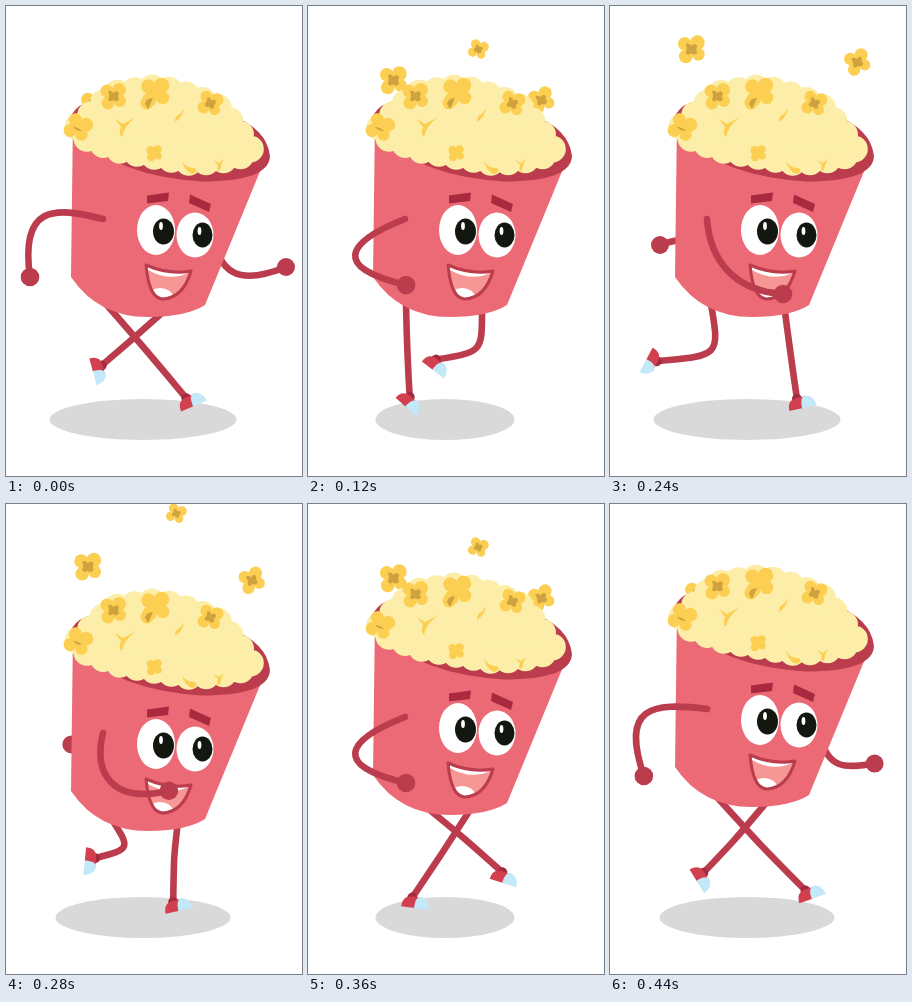
These frames come from a looping animation (296x470 px, 480 ms). An HTML page:

```html
<!DOCTYPE html>
<html lang="en">
<head>
<meta charset="utf-8">
<title>Running popcorn</title>
<style>
html, body { margin: 0; width: 100%; height: 100%; overflow: hidden; background: #fff; }
svg { display: block; width: 296px; height: 470px; }
.limb { fill: none; stroke: #bb3c4d; stroke-width: 6.6; stroke-linecap: round; stroke-linejoin: round; }
.dark { fill: #bb3c4d; }
.gold { fill: #fccf52; }
.brown { fill: #cda23f; }
/* Zero-length round dashes make the bumps of the heap. */
.heap { fill: #fceea8; stroke: #fceea8; stroke-width: 27; stroke-linecap: round; stroke-dasharray: 0 17.5; }
</style>
</head>
<body>
<svg viewBox="0 0 296 470" xmlns="http://www.w3.org/2000/svg">
  <defs>
    <path id="mouth" d="M140 259Q163 269 185 265Q177 292 157 293Q143 293 140 259Z"/>
    <clipPath id="lips"><use href="#mouth"/></clipPath>
    <g id="shoe">
      <circle fill="#a32a40" cx="-4" cy="-10" r="5"/>
      <path fill="#d2404f" d="M-14 0Q-14 -11 -4 -11L3 -11L0 0Z"/>
      <path fill="#c3e8f7" d="M-1 0Q-1 -12 5 -12Q13 -10 14 0Z"/>
    </g>
    <g id="petals" class="gold">
      <circle cx="-6" cy="-5" r="6.5"/><circle cx="6" cy="-6" r="7"/>
      <circle cx="7" cy="5" r="6"/><circle cx="-5" cy="7" r="6.5"/><circle r="7"/>
    </g>
    <g id="kernel">
      <use href="#petals"/>
      <path class="brown" d="M-5 -5Q-1 -6 0 -3Q5 -7 6 -2Q4 0 6 3Q4 7 0 4Q-4 7 -5 3Q-3 0 -5 -5Z"/>
    </g>
  </defs>
  <ellipse id="shadow" cx="137" cy="413.5" ry="20.5" fill="#d9d9d9"/>
  <g id="farArm"><path class="limb"/><circle class="dark" r="9"/></g>
  <g id="farLeg"><path class="limb"/><use href="#shoe"/></g>
  <g id="nearLeg"><path class="limb"/><use href="#shoe"/></g>
  <g class="body">
    <path fill="#ec6a75" d="M67 112L65 271Q92 311 142 311Q180 311 199 299L255 163L200 130Z"/>
    <path class="dark" d="M66 108Q72 98 86 95L225 109Q261 123 264 150Q263 175.500 196 175.500Q112 170 72 130Z"/>
  </g>
  <g id="flyers"><use href="#kernel"/><use href="#kernel"/><use href="#kernel"/></g>
  <g class="body">
    <path class="heap" d="M72 121L90 104L107 88L146 82L168 85L210 99L230 122L247 147L216 154L187 157L112 144L78 131Z"/>
    <use href="#kernel" transform="translate(107 90)"/>
    <use href="#kernel" transform="translate(204 97) rotate(20) scale(.92)"/>
    <use href="#petals" transform="translate(149 86) scale(1.1)"/>
    <use href="#petals" transform="translate(72 121) rotate(30)"/>
    <use href="#petals" transform="translate(148 147) scale(.6)"/>
    <circle class="gold" cx="141" cy="97" r="6.5"/>
    <g class="gold">
      <path d="M109 113L117 118L130 111Q118 120 116 131Q112 128 115 121Z"/>
      <path d="M178 102Q177 111 169 116Q169 109 174 108Z"/>
      <path d="M176 154Q180 163 189 162Q193 166 186 168Q178 165 176 154Z"/>
      <path d="M207 154L213 157L218 153L215 159L214 165L211 164L212 159Z"/>
    </g>
    <path class="brown" d="M139 98Q140 92 147 92Q145 97 142 103ZM67 121Q72 121 76 125Q70 125 67 121Z"/>
    <path fill="#a92a3f" d="M141 189.500L163 186.500L162 195L141 197.500ZM184 188.500L205 198L203 206L183 197Z"/>
    <g fill="#fff"><ellipse cx="150" cy="224" rx="19" ry="25"/><ellipse cx="189" cy="229" rx="18.500" ry="22.500"/></g>
    <g fill="#12170f"><ellipse cx="157.500" cy="225.500" rx="10.500" ry="13"/><ellipse cx="196.500" cy="229" rx="10" ry="12.500"/></g>
    <g fill="#fff"><ellipse cx="155" cy="220" rx="1.900" ry="4"/><ellipse cx="193.500" cy="225" rx="1.900" ry="4"/></g>
    <g clip-path="url(#lips)">
      <path fill="#f69695" d="M138 256H188V296H138Z"/>
      <path fill="#fff" d="M138 256H188L182 267Q163 276 142 264Z"/>
      <ellipse cx="154" cy="291" rx="13" ry="9" fill="#fff"/>
    </g>
    <use href="#mouth" fill="none" stroke="#bb3c4d" stroke-width="3" stroke-linejoin="round"/>
  </g>
  <g id="nearArm"><path class="limb"/><circle class="dark" r="9.300"/></g>
</svg>
<script>
const STEP = 40, COUNT = 12;
const $ = id => document.getElementById(id);

// Four key poses per leg, a quarter loop apart: hip x, knee x y, shoe x y angle
const nearLeg = [
  [100, 143, 347, 188, 400, -23], [98, 99, 347, 98, 401, 42],
  [101, 110, 350, 36, 354, 118], [112, 156, 334, 195, 379, 18]
];
const farLeg = [
  [157, 127, 333, 87, 366, 75], [174, 174, 346, 125, 364, 37],
  [175, 181, 352, 193, 402, -12], [162, 134, 350, 107, 404, 7]
];

// Near arm swung back, halfway and forward: two bend points, then the hand
const armBack = [47, 200, 14, 200, 24, 271];
const armMid = [36, 237, 25, 262, 98, 279];
const armFront = [100, 255, 125, 285, 173, 288];

// Tossed kernels: resting place, sideways drift, height of the jump
const tosses = [
  { x: 85, y: 74, drift: -4, jump: 31, turn: 0, size: 1.05 },
  { x: 170, y: 43, drift: 0, jump: 56, turn: 25, size: .72 },
  { x: 233, y: 94, drift: 14, jump: 38, turn: -15, size: .95 }
];

function place(node, x, y, extra = "") {
  node.setAttribute("transform", `translate(${x} ${y}) ${extra}`);
}

// Smooth closed curve through the four key poses
function cycle(keys, i) {
  const k = Math.floor(i / 3), u = i % 3 / 3;
  const [a, b, c, d] = [3, 4, 5, 6].map(n => keys[(k + n) % 4]);
  return b.map((v, j) => v + u / 2 * (c[j] - a[j]
    + u * (2 * a[j] - 5 * v + 4 * c[j] - d[j]
    + u * (3 * (v - c[j]) + d[j] - a[j]))));
}

// Parabola through three poses for s = 1, 0, -1
const blend = (a, mid, b, s) =>
  mid.map((m, j) => m + s * (a[j] - b[j]) / 2 + s * s * ((a[j] + b[j]) / 2 - m));

function drawLimb(id, d, x, y, turn = 0) {
  const [path, end] = $(id).children;
  path.setAttribute("d", d);
  place(end, x, y, `rotate(${turn})`);
}

function drawLeg(id, keys, i, hipY) {
  const [hip, kx, ky, x, y, angle] = cycle(keys, i);
  const a = angle * Math.PI / 180, cos = Math.cos(a), sin = Math.sin(a);
  const ankle = `${x - 4 * cos + 10 * sin} ${y - 4 * sin - 10 * cos}`;
  drawLimb(id, `M${hip} ${hipY}C${kx} ${ky} ${kx} ${ky} ${ankle}`, x, y, angle);
}

function draw(ms) {
  const i = Math.floor(ms / STEP) % COUNT;
  const swing = Math.cos(i * Math.PI / 6);

  // Every third pose is level; the body drops on one stride half, rises on the other.
  const k = i % 3;
  const dy = (k ? 24 - 8 * k : 0) * (i % 6 < 3 ? 1 : -1);
  document.querySelectorAll(".body").forEach(g => place(g, 0, dy));
  $("shadow").setAttribute("rx", 81.5 + 12 * Math.cos(i * Math.PI / 3));

  drawLeg("nearLeg", nearLeg, i, 298 + dy);
  drawLeg("farLeg", farLeg, i, 306 + dy);

  const [ax, ay, bx, by, hx, hy] = blend(armBack, armMid, armFront, swing);
  drawLimb("nearArm",
    `M97 ${213 + dy}C${ax} ${ay + dy} ${bx} ${by + dy} ${hx} ${hy}`, hx, hy);

  const fx = 165 + 115 * swing, fy = 250 + 11 * swing;
  const sag = fy + (14 + dy) * swing;
  drawLimb("farArm",
    `M210 ${240 + dy}C218 ${sag} ${fx - 35 * swing} ${sag} ${fx} ${fy}`, fx, fy);

  const arc = Math.max(-.8, 1 - ((i - 6) / 3) ** 2);
  tosses.forEach((t, n) => place($("flyers").children[n],
    t.x + t.drift * arc, t.y - t.jump * arc + dy,
    `rotate(${t.turn}) scale(${t.size})`));
}

const start = performance.now();
function tick(now) {
  draw(Math.max(0, now - start));
  requestAnimationFrame(tick);
}
draw(0);
requestAnimationFrame(tick);
</script>
</body>
</html>
```
